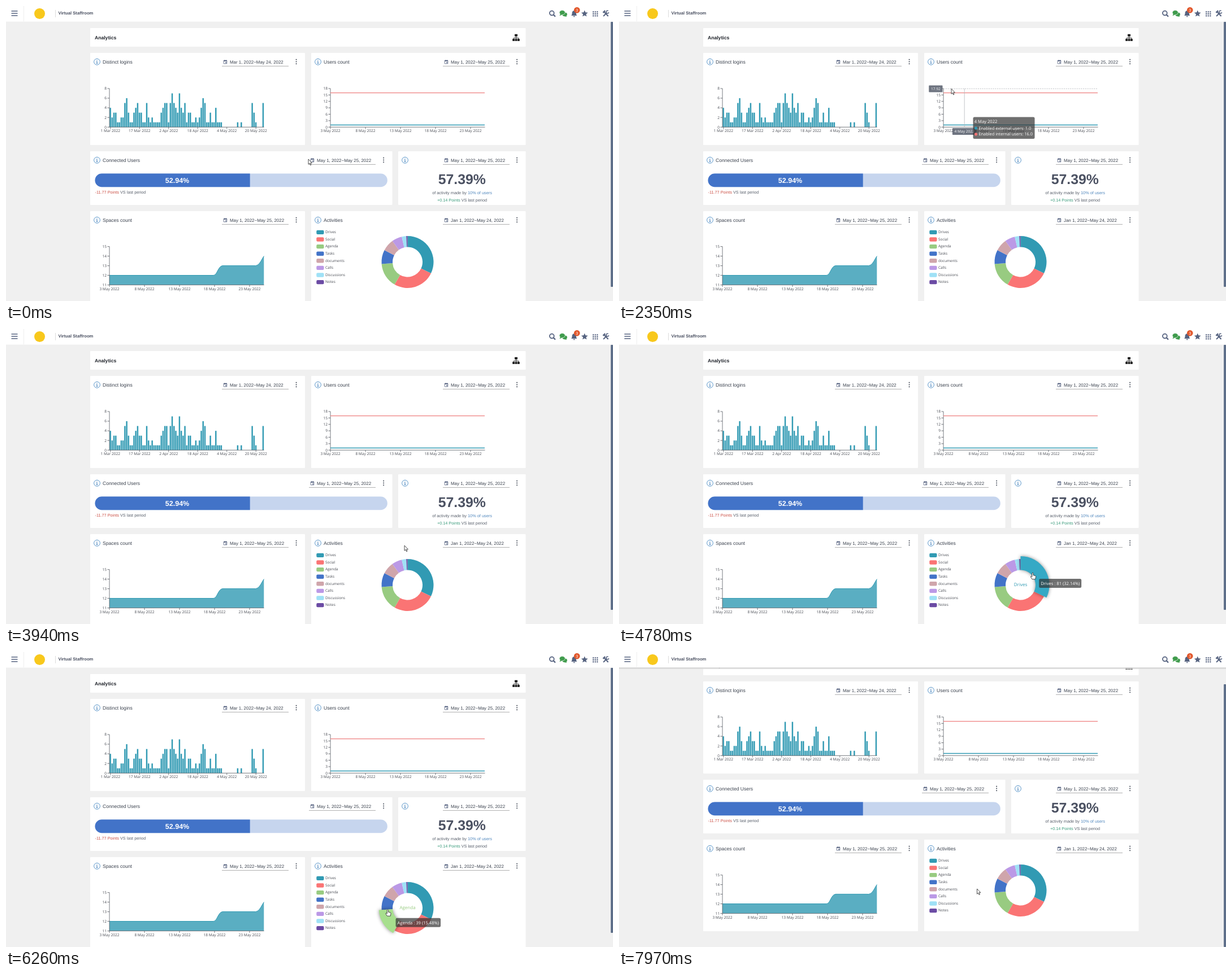
Write an HTML page that moves like this. It is 1074 by 522 pixels and loops after 8 s.

```html
<!DOCTYPE html>
<html lang="en">
<head>
<meta charset="utf-8">
<title>Analytics dashboard</title>
<style>
  html, body { margin: 0; width: 100%; height: 100%; overflow: hidden; background: #f0f0f0; }
  svg { display: block; width: 1074px; height: 522px; }
  text { font-family: "Liberation Sans", Arial, sans-serif; text-rendering: geometricPrecision; white-space: pre; }
  .chart { font-family: "Open Sans", "Noto Sans", sans-serif; }
  .bold { font-weight: 700; }
  .lifted { filter: drop-shadow(0 0 3px rgba(0, 0, 0, .45)); }
</style>
</head>
<body>
<svg id="stage" viewBox="0 0 1074 522">
  <rect width="1074" height="522" fill="#f0f0f0"/>
  <g id="page"><g id="cards"></g><g id="pie"></g></g>
  <g id="overlay"></g>
  <rect id="thumb" x="1070" width="4" rx="1" fill="#5f708a"/>
  <g id="header"></g>
  <g id="cursor" stroke-linejoin="round"></g>
</svg>
<script>
const $ = id => document.getElementById(id);
const LOOP = 8000, LAG = 50, SCROLL = 31;
const INK = '#3b424e', SLATE = '#566380', TEAL = '#319ab3', RED = '#fa7474', BLUE = '#4273c8';

// Markup helpers
const rect = (x, y, w, h, fill, rx = 0, extra = '') =>
  `<rect x="${x}" y="${y}" width="${w}" height="${h}" rx="${rx}" fill="${fill}" ${extra}/>`;
const path = (d, stroke, width = 1, fill = 'none', extra = '') =>
  `<path d="${d}" stroke="${stroke}" stroke-width="${width}" fill="${fill}" ${extra}/>`;
const circle = (x, y, r, fill, extra = '') => `<circle cx="${x}" cy="${y}" r="${r}" fill="${fill}" ${extra}/>`;
const text = (x, y, s, size, fill = INK, anchor = 'start', cls = '') =>
  `<text x="${x}" y="${y}" font-size="${size}" fill="${fill}" text-anchor="${anchor}" class="${cls}">${s}</text>`;
const label = (x, y, s, anchor = 'middle', size = 6.6, fill = '#4a4d55') => text(x, y, s, size, fill, anchor, 'chart');
const range = n => [...Array(n).keys()];

const ruler = document.createElement('canvas').getContext('2d');
const widthOf = (s, size) => {
  ruler.font = `${size}px "Open Sans", "Noto Sans", sans-serif`;
  return ruler.measureText(s).width;
};

// Data
const logins = [...'4233112256311345331152121111345515754374' +
  '351331121246511311411100000000' + '101000005310005'].map(Number);
const slices = [
  ['Drives', 81, TEAL, '#36a9c5'], ['Social', 66, RED, '#ff8080'], ['Agenda', 39, '#98cb81', '#a7df8e'],
  ['Tasks', 22, BLUE, '#487edc'], ['documents', 19, '#cfa5ab', '#e3b5bc'], ['Calls', 16, '#bb99e6', '#cda8fd'],
  ['Discussions', 7, '#9fe1f6', '#aef7ff'], ['Notes', 2, '#6b4ba4', '#7652b4']
].map(([name, count, color, bright]) => ({ name, count, color, bright }));
const total = slices.reduce((sum, s) => sum + s.count, 0);
let turned = 0;
for (const s of slices) {
  s.from = turned;
  s.to = turned += s.count / total * 2 * Math.PI;
}

const LEFT = 183, BASE = 214.3, PITCH = 3.218, UNIT = 8.53;
const LINE_LEFT = 574, DAY = 12.4, LINE_UNIT = 3.79;
const PIE = { x: 710.5, y: 453, inner: 26.5, outer: 46 };

function infoIcon(x, y) {
  return circle(x, y, 5.4, 'none', 'stroke="#4a8cc4" stroke-width=".9"') +
    path(`M${x} ${y - 3}v1.3M${x - 1} ${y - .8}h1v3.4M${x - 1.2} ${y + 2.7}h2.4`, '#3f7db8', 1);
}

function dateField(x, y, s) {
  const ix = x + 3.2;
  return path(`M${ix} ${y - 2.2}h5.6v5.4h-5.6z`, SLATE, .8) + rect(ix, y - 2.6, 5.6, 1.6, SLATE) +
    rect(ix + 1, y - 3.6, 1, 1.4, SLATE) + rect(ix + 3.6, y - 3.6, 1, 1.4, SLATE) +
    rect(ix + 3, y + .6, 1.8, 1.8, SLATE) +
    text(x + 14, y + 2.9, s, 7.92) + path(`M${x} ${y + 7.6}h118`, '#9a9a9a', .8);
}

function card(x, y, w, h, title, dateX, date) {
  const cy = y + 15.8;
  return rect(x, y, w, h, '#fff', 1) + infoIcon(x + 12, cy) + text(x + 22, cy + 3, title, 8.57) +
    dateField(dateX, cy, date) +
    [-3.8, 0, 3.8].map(d => circle(x + w - 15.4, cy + d - .3, 1.05, '#444b58')).join('');
}

function axes(x, base, top, ticksX, step, labelsX, labelsY) {
  const gap = (base - top) / (labelsY.length - 1);
  let out = path(`M${x} ${top}V${base}H${x + 273.5}`, '#555860', .8);
  labelsY.forEach((v, i) => {
    const y = base - i * gap;
    out += path(`M${x - 3.6} ${y}h3.6`, '#555860', .8) + label(x - 5, y + 2.3, v, 'end');
  });
  labelsX.forEach((s, i) => {
    out += path(`M${ticksX + i * step} ${base}v3.4`, '#555860', .8) + label(ticksX + i * step, base + 9.1, s);
  });
  return out;
}

const mayDays = [3, 8, 13, 18, 23].map(d => `${d} May 2022`);
const May = 'May 1, 2022~May 25, 2022';

function drawCards() {
  let out = rect(149, 39, 770.5, 33, '#fff', 1) + text(157, 58.6, 'Analytics', 8.6, '#20242b', 'start', 'bold');
  // Hierarchy icon
  out += rect(900, 49.8, 5, 4, '#222') + path('M902.5 53.8v4M898.5 58.5v-2.2h8.2v2.2', '#222', .9) +
    [896.2, 900.6, 905].map(x => rect(x, 58, 3.8, 4, '#222')).join('');

  out += card(149, 83, 380, 163, 'Distinct logins', 382, 'Mar 1, 2022~May 24, 2022');
  logins.forEach((n, i) => {
    if (n) out += rect(LEFT + i * PITCH + .4, BASE - n * UNIT, 2.45, n * UNIT, TEAL);
  });
  out += axes(LEFT, BASE, 146, 184.8, 16 * PITCH,
    ['1 Mar', '17 Mar', '2 Apr', '18 Apr', '4 May', '20 May'].map(s => s + ' 2022'), [0, 2, 4, 6, 8]);

  out += card(540, 83, 379.5, 163, 'Users count', 773, May) +
    axes(LINE_LEFT, BASE, 146, LINE_LEFT, 5 * DAY, mayDays, range(7).map(i => i * 3)) +
    path('M574 153.6h273', '#ee8080', 1.3) + path('M574 210.5h273', TEAL, 1.3);

  out += card(149, 257, 534.5, 95, 'Connected Users', 536, May) +
    rect(157.5, 296.5, 517.3, 23.8, '#c6d5ee', 11.9) +
    path('M431.7 296.5H169.4a11.9 11.9 0 0 0 0 23.8H431.7z', 'none', 0, BLUE) +
    text(303, 312.6, '52.94%', 12.5, '#fff', 'middle', 'bold') +
    text(157.5, 332, '<tspan fill="#cb4f45">-11.77 Points</tspan> VS last period', 7.3, '#59606c');

  out += card(694, 257, 225.5, 95, '', 773, May) +
    text(806.8, 314.6, '57.39%', 24.8, '#4b5162', 'middle', 'bold') +
    text(807, 332.5, 'of activity made by <tspan fill="#4f86bd">10% of users</tspan>', 7.35, '#59606c', 'middle') +
    text(807, 346, '<tspan fill="#3b9c7c">+0.14 Points</tspan> VS last period', 7.3, '#59606c', 'middle');

  const edge = 'M183 476.5H367C374 476.5 375 459.4 384 459.4H438C448 461 450 452 456.3 442.5';
  out += card(149, 363, 380, 162, 'Spaces count', 382, May) +
    path(edge + 'V493.6H183z', 'none', 0, '#5aaec2') + path(edge, TEAL, 1) +
    axes(LEFT, 493.6, 425.6, LEFT, 5 * DAY, mayDays, [11, 12, 13, 14, 15]);

  out += card(540, 363, 379.5, 162, 'Activities', 773, 'Jan 1, 2022~May 24, 2022');
  slices.forEach((s, i) => {
    const y = 400.3 + i * 12.6;
    out += rect(549.3, y - 3.6, 13.2, 7.4, s.color, 2) + label(565, y + 1.9, s.name, 'start', 6.45);
  });
  $('cards').innerHTML = out;
}

function drawHeader() {
  const star = range(10).map(i => {
    const a = i * Math.PI / 5, r = i % 2 ? 2.8 : 6.2;
    return `${1023.7 + r * Math.sin(a)},${13.6 - r * Math.cos(a)}`;
  }).join(' ');
  $('header').innerHTML =
    `<g id="shadow">${rect(0, 27, 1074, 1.8, '#c4c4c4')}${rect(0, 28.8, 1074, 1.4, '#e2e2e2')}</g>` +
    rect(0, 0, 1074, 27.6, '#fff') +
    path('M9.5 9h11M9.5 13h11M9.5 17h11', SLATE, 1.7) +
    path('M31.5 0v27.5', '#eee') + circle(59.5, 13.5, 9.5, '#f8c81c') +
    path('M87.5 7v13', '#dcdcdc') + text(92.5, 15.3, 'Virtual Staffroom', 7.65, '#4b5162', 'start', 'bold') +
    circle(965.8, 12.6, 3.9, 'none', `stroke="${SLATE}" stroke-width="1.8"`) +
    path('M968.8 15.6l3.2 3.2', SLATE, 2.2) +
    `<ellipse cx="988.5" cy="14.8" rx="4.4" ry="3.4" fill="#3f9b4c"/><path d="M990 16l2.6 3-5-1z" fill="#3f9b4c"/>` +
    `<ellipse cx="984.2" cy="11.6" rx="5.1" ry="4" fill="#3f9b4c" stroke="#fff" stroke-width=".7"/><path d="M981 14l-1.7 3.2 4.5-1.7z" fill="#3f9b4c"/>` +
    path('M1000 17c1.6-1.4 1.4-3 1.6-5 .3-2.4 1.7-3.8 3.6-3.8s3.3 1.4 3.6 3.8c.2 2 0 3.6 1.6 5zM1003.6 17.8h3.2a1.6 1.6 0 0 1-3.2 0', 'none', 0, SLATE) +
    circle(1010.2, 7.3, 5.3, '#e2572b') + text(1010.2, 9.8, '3', 7, '#fff', 'middle') +
    `<polygon points="${star}" fill="${SLATE}"/>` +
    range(9).map(i => rect(1038 + i % 3 * 3.6, 9.3 + Math.floor(i / 3) * 3.5, 2.2, 2.2, SLATE, .5)).join('') +
    path('M1058 10l7.5 8', SLATE, 2) + path('M1056.4 11.8l3.6-3.6', SLATE, 2.4) +
    path('M1057 18l6-6', SLATE, 2) + path('M1065.6 8.6a2.4 2.4 0 1 0 1 2.6', SLATE, 1.6);
}

// Pointer route: time, x, y
const route = [
  [0, 535, 271], [240, 535, 271], [640, 480, 235], [1040, 385, 186], [1140, 317, 177], [1190, 284.5, 178],
  [1450, 250, 172], [1850, 290, 180], [2100, 480, 190], [2300, 613, 184], [2350, 588, 146.4],
  [2750, 588, 146.4], [3350, 698, 205], [3550, 698, 263], [3940, 705, 383], [4370, 709, 412],
  [4800, 733, 432], [5180, 735, 462], [5540, 732, 471], [5590, 684, 475], [6000, 676, 466],
  [6450, 675, 448], [6830, 676, 428], [7050, 676, 428], [7100, 673, 431], [7400, 633, 427],
  [7820, 633, 427], [7970, 633.5, 419]
];

function pointerAt(t) {
  const i = route.findIndex(k => k[0] > t);
  if (i <= 0) {
    const [, x, y] = route[i < 0 ? route.length - 1 : 0];
    return { x, y };
  }
  const [t0, x0, y0] = route[i - 1], [t1, x1, y1] = route[i];
  const f = (t - t0) / (t1 - t0);
  return { x: x0 + (x1 - x0) * f, y: y0 + (y1 - y0) * f };
}

const inPlot = (p, left) => p.x >= left && p.x < left + 273.5 && p.y >= 146 && p.y <= BASE;

function sliceAt(p, scroll) {
  const dx = p.x - PIE.x, dy = p.y - PIE.y + scroll, r = Math.hypot(dx, dy);
  if (r < PIE.inner || r > PIE.outer) return null;
  const a = (Math.atan2(dx, -dy) + 2 * Math.PI) % (2 * Math.PI);
  return slices.find(s => a < s.to);
}

function arc(s, active) {
  const R = PIE.outer + (active ? 5 : 0), r = PIE.inner, big = +(s.to - s.from > Math.PI);
  const at = (a, q) => `${PIE.x + q * Math.sin(a)} ${PIE.y - q * Math.cos(a)}`;
  return path(`M${at(s.from, R)}A${R} ${R} 0 ${big} 1 ${at(s.to, R)}L${at(s.to, r)}A${r} ${r} 0 ${big} 0 ${at(s.from, r)}z`,
    'none', 0, active ? s.bright : s.color, active ? 'class="lifted"' : '');
}

function drawPie(active) {
  $('pie').innerHTML = slices.filter(s => s !== active).map(s => arc(s)).join('') +
    (active ? arc(active, true) + label(PIE.x, PIE.y + 2, active.name, 'middle', 8, active.color) : '');
}

function axisTag(x, y, s, anchor) {
  const w = widthOf(s, 6.6) + 7.4, left = anchor === 'end' ? x - w : x - w / 2;
  return rect(left, y - 6, w, 12, '#6e7480', 1) + label(left + w / 2, y + 2.3, s, 'middle', 6.6, '#fff');
}

const crosshair = (left, x, y) =>
  path(`M${x} 146V${BASE}`, '#b4b6ba', .8) + path(`M${left} ${y}h273.5`, '#b4b6ba', .8, 'none', 'stroke-dasharray="2.2 1.6"');

const tipBox = (p, w, h) => rect(p.x + 14, p.y + 13.3, w, h, 'rgba(50,50,50,.7)', 2.5);

function loginsHover(p, late) {
  const i = Math.floor((p.x - LEFT) / PITCH), x = LEFT + (i + .5) * PITCH;
  const day = new Date(2022, 2, 1 + i);
  const date = `${day.getDate()} ${['Mar', 'Apr', 'May'][day.getMonth() - 2]} 2022`;
  const w = widthOf(date, 7.6) + 6, cx = late.x + 14 + w / 2;
  return crosshair(LEFT, x, p.y) + axisTag(182, p.y, ((BASE - p.y) / UNIT).toFixed(2), 'end') +
    axisTag(x, 222, date) + tipBox(late, w, 26) +
    label(cx, late.y + 23.3, date, 'middle', 7.6, '#fff') + label(cx, late.y + 34.3, logins[i], 'middle', 7.6, '#fff');
}

function usersHover(p, late) {
  const dayOf = q => Math.round((q.x - LINE_LEFT) / DAY);
  const x = LINE_LEFT + Math.max(0, dayOf(late)) * DAY, date = `${3 + dayOf(p)} May 2022`;
  const tx = late.x + 16.3, ty = late.y + 13.3;
  const row = (y, color, s) => circle(tx + 2.7, y - 2.5, 2.6, color) + label(tx + 7.6, y, s, 'start', 7.4, '#fff');
  return crosshair(LINE_LEFT, x, p.y) +
    axisTag(572.5, p.y, Math.min(18, (BASE - p.y) / LINE_UNIT).toFixed(2), 'end') +
    axisTag(x, 222, date) + tipBox(late, 109, 38.5) +
    label(tx, ty + 10.5, date, 'start', 7.6, '#fff') +
    row(ty + 22, TEAL, 'Enabled external users: 1.0') + row(ty + 32.8, RED, 'Enabled internal users: 16.0');
}

function pieHover(s, late) {
  const line = `${s.name} : ${s.count} (${(s.count / total * 100).toFixed(2)}%)`;
  return tipBox(late, widthOf(line, 7.6) + 6, 16) + label(late.x + 17, late.y + 24, line, 'start', 7.6, '#fff');
}

const arrow = path('M0 0V9.2L2.1 7.3 3.6 10.7 5 10 3.5 6.8H6.4Z', '#222', .8, '#fff');
const hand = path('M-1.1 1Q0-.9 1.1 1V4.6L4.6 5.4Q5.8 5.8 5.6 7.2L4.8 11.6H-1L-3.4 7.8Q-3.8 6-2.2 6.4L-1.1 7.4Z', '#222', .8, '#fff');

function draw(now) {
  const t = now % LOOP;
  const p = pointerAt(t), late = pointerAt(t - LAG);
  const f = Math.min(1, Math.max(0, (t - 7400) / 170));
  const eased = f * f * (3 - 2 * f), scroll = SCROLL * eased;

  $('page').setAttribute('transform', `translate(0 ${-scroll})`);
  $('thumb').setAttribute('y', 28 + 29 * eased);
  $('thumb').setAttribute('height', 469 - 4 * eased);
  $('shadow').setAttribute('opacity', Math.min(1, scroll / 4));

  const active = sliceAt(late, scroll);
  drawPie(active);
  const onLogins = inPlot(p, LEFT);
  $('overlay').innerHTML = onLogins ? loginsHover(p, late)
    : inPlot(p, LINE_LEFT) ? usersHover(p, late)
    : active ? pieHover(active, late) : '';

  const onBar = onLogins && p.y > BASE - logins[Math.floor((p.x - LEFT) / PITCH)] * UNIT;
  $('cursor').innerHTML = onBar || sliceAt(p, scroll) ? hand : arrow;
  $('cursor').setAttribute('transform', `translate(${p.x} ${p.y})`);
}

drawCards();
drawHeader();
const start = performance.now();
(function frame() {
  draw(performance.now() - start);
  requestAnimationFrame(frame);
})();
</script>
</body>
</html>
```
